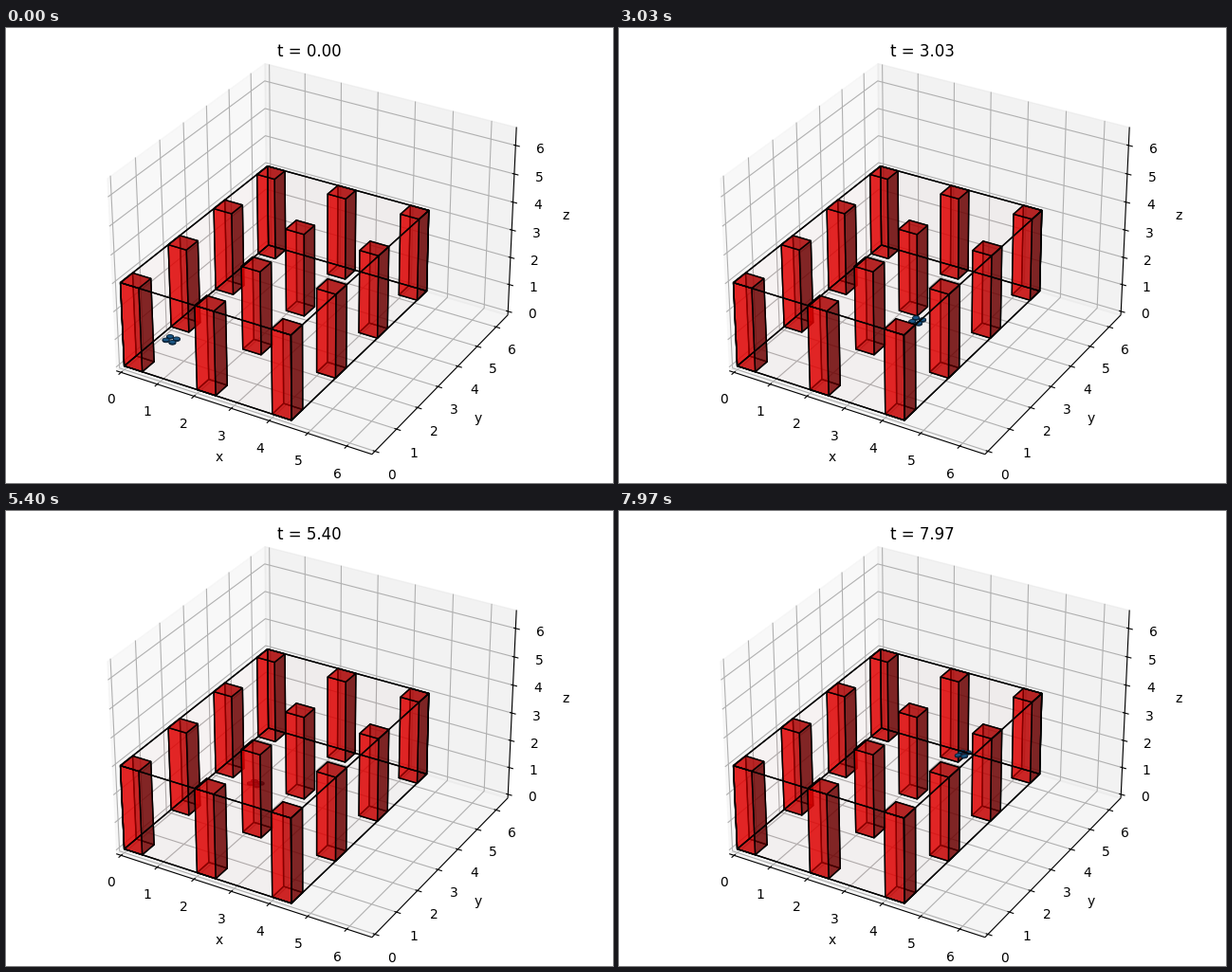
A matplotlib script that plays this animation: 640x480 px, repeating every 8 s.

```python
import itertools

import matplotlib.pyplot as plt
import numpy as np
from matplotlib.animation import FuncAnimation
from matplotlib.collections import LineCollection, PolyCollection

FPS, LOOP_MS, TICK_MS = 30, 8000, 20
SIZE = 6.5                      # axis length in metres
MARGIN = SIZE / 48
STEP = SIZE / 12                # unit for tick and label offsets
BOUNDS = (4.5, 6.5, 3.0)

# Perspective camera: elevation 30, azimuth -60, distance 10
BOX = np.array([8, 8, 6]) / 7
DIST = 10
SCALE = 480 / 0.185
CENTER = np.array([80, 0]) + 0.095 * SCALE
ELEV, AZIM = np.radians([30, -60])
BACK = np.array([np.cos(ELEV) * np.cos(AZIM),
                 np.cos(ELEV) * np.sin(AZIM), np.sin(ELEV)])
RIGHT = np.array([-np.sin(AZIM), np.cos(AZIM), 0])
UP = np.cross(BACK, RIGHT)


def project(points):
    """Return pixel positions and depths of world points."""
    q = (np.asarray(points, float) / SIZE - 0.5) * BOX
    depth = DIST - q @ BACK
    flat = np.stack([q @ RIGHT, q @ UP], axis=-1) / depth[..., None]
    return CENTER + SCALE * flat, depth


def pixels(points):
    return project(points)[0]


fig = plt.figure(figsize=(6.4, 4.8), dpi=100, facecolor="white")
ax = fig.add_axes([0, 0, 1, 1])
ax.set_xlim(0, 640)
ax.set_ylim(0, 480)
ax.axis("off")

# ---- axes: panes, grid, ticks and labels ----
LOW, HIGH = -MARGIN, SIZE + MARGIN
FAR = np.array([LOW, HIGH, LOW])
NEAR = np.array([HIGH, LOW, HIGH])


def edge_point(axis, value, shift=0.0):
    """Point on an axis line, pushed away from the centre by shift."""
    side = (1, 0, 0)[axis]
    p = FAR.copy()
    p[side] = NEAR[side]
    for k in range(3):
        if k != axis:
            p[k] += np.sign(p[k] - SIZE / 2) * shift
    p[axis] = value
    return p


def draw_pane(axis, gray):
    a, b = [k for k in range(3) if k != axis]
    corners = np.tile(FAR, (4, 1))
    corners[1:3, a] = NEAR[a]
    corners[2:4, b] = NEAR[b]
    color = (gray, gray, gray, 0.5)
    ax.add_collection(PolyCollection([pixels(corners)], facecolors=[color],
                                     edgecolors=[color], linewidths=1, zorder=1))


def draw_axis(axis, name):
    a, b = [k for k in range(3) if k != axis]
    side = (1, 0, 0)[axis]
    grid, marks = [], []
    for value in range(7):
        line = np.tile(FAR, (3, 1))
        line[0, a] = NEAR[a]
        line[2, b] = NEAR[b]
        line[:, axis] = value
        grid.append(pixels(line))

        ends = np.tile(edge_point(axis, value), (2, 1))
        out = np.sign(ends[0, side] - SIZE / 2)
        ends[:, side] += out * STEP * np.array([-0.1, 0.2])
        marks.append(pixels(ends))

        x, y = pixels(edge_point(axis, value, 11.5 * STEP * 48 / 691.2))
        ax.text(x, y, str(value), fontsize=10, ha="center", va="top")

    marks.append(pixels([edge_point(axis, LOW), edge_point(axis, HIGH)]))
    ax.add_collection(LineCollection(grid, colors="#b0b0b0", linewidths=0.8, zorder=2))
    ax.add_collection(LineCollection(marks, colors="k", linewidths=0.8, zorder=3))
    x, y = pixels(edge_point(axis, SIZE / 2, 25 * STEP * 48 / 691.2))
    ax.text(x, y, name, fontsize=10, ha="center", va="center")


for axis, gray in enumerate((0.95, 0.90, 0.925)):
    draw_pane(axis, gray)
for axis, name in enumerate("xyz"):
    draw_axis(axis, name)

title = ax.text(320, 0.92 * 480 + 6 * 100 / 72, "", fontsize=12, ha="center",
                va="baseline")

# ---- solid scene ----
LIGHT = np.array([-2, -2, 1]) / 3


def shade(axis, end):
    """Brightness of the low (0) or high (1) face along an axis."""
    return 0.65 + 0.35 * LIGHT[axis] * (1 if end else -1)


def solid(faces, edge, width):
    """Project (corners, colour) faces; return nearest depth and sorted polygons."""
    items, nearest = [], np.inf
    for corners, color in faces:
        poly, depth = project(corners)
        nearest = min(nearest, depth.min())
        items.append((depth.mean(), poly, color, edge, width))
    items.sort(key=lambda item: -item[0])
    return nearest, [item[1:] for item in items]


def cuboid(origin, span, alpha):
    origin, span = np.array(origin, float), np.array(span, float)
    faces = []
    for axis, end in itertools.product(range(3), (0, 1)):
        a, b = [k for k in range(3) if k != axis]
        unit = np.zeros((4, 3))
        unit[:, axis] = end
        unit[1:3, a] = 1
        unit[2:4, b] = 1
        faces.append((origin + unit * span, (shade(axis, end), 0, 0, alpha)))
    return solid(faces, (0, 0, 0, 1), 1.0)


pillars = [cuboid((x, y, 0), (0.5, 0.5, 3), 0.6)
           for x, y in itertools.product((0, 2, 4), (0, 2, 4, 6))]
room = cuboid((0, 0, 0), BOUNDS, 0.01)

scene = PolyCollection([], zorder=4)
ax.add_collection(scene)

# ---- quadrotor ----
ROUTE = np.array([
    # time, x, y
    (0.00, 1.00, 0.50), (0.83, 1.37, 0.72), (1.45, 2.20, 1.15),
    (2.10, 3.19, 1.68), (2.90, 3.25, 2.62), (3.83, 3.02, 3.27),
    (4.60, 2.50, 3.12), (5.40, 1.78, 2.96), (6.43, 1.21, 3.90),
    (7.15, 1.78, 4.80), (7.97, 3.05, 5.27), (8.60, 3.60, 5.40)])
KNOTS, STOPS = ROUTE[:, 0], ROUTE[:, 1:]
SPEEDS = np.gradient(STOPS, KNOTS, axis=0)
SPEEDS[0] = 0
HEIGHT, ARM, ROTOR, THICK = 1.0, 0.125, 0.08, 0.03
RING = np.linspace(0, 2 * np.pi, 13)[:-1]
BLUE = np.array([0.122, 0.467, 0.706])


def position(t):
    """Cubic Hermite curve through the route."""
    t = max(t, 0.0)
    i = min(np.searchsorted(KNOTS, t, side="right") - 1, len(KNOTS) - 2)
    h = KNOTS[i + 1] - KNOTS[i]
    s = (t - KNOTS[i]) / h
    xy = ((1 + 2 * s) * (1 - s) ** 2 * STOPS[i]
          + s * (1 - s) ** 2 * h * SPEEDS[i]
          + s * s * (3 - 2 * s) * STOPS[i + 1]
          + s * s * (s - 1) * h * SPEEDS[i + 1])
    return np.append(xy, HEIGHT)


def attitude(t, d=0.2):
    """Tilt so that thrust supports gravity and acceleration."""
    accel = (position(t + d) - 2 * position(t) + position(t - d)) / d ** 2
    b3 = accel + np.array([0, 0, 9.81])
    b3 /= np.linalg.norm(b3)
    b2 = np.cross(b3, (1, 0, 0))
    b2 /= np.linalg.norm(b2)
    return np.column_stack([np.cross(b2, b3), b2, b3])


def quadrotor(t):
    """One flat cylinder per rotor."""
    center, rot = position(t), attitude(t)
    rotors = []
    for angle in np.pi / 4 + np.arange(4) * np.pi / 2:
        faces = []
        for end in (0, 1):
            disc = np.column_stack([ARM * np.cos(angle) + ROTOR * np.cos(RING),
                                    ARM * np.sin(angle) + ROTOR * np.sin(RING),
                                    np.full(len(RING), end * THICK)])
            faces.append((center + disc @ rot.T, (*BLUE * shade(2, end), 1)))
        rotors.append(solid(faces, (0.02, 0.12, 0.2, 1), 0.6))
    return rotors


def update(n):
    # each picture starts on the nearest 10 ms; look at the middle of the tick
    ms = (n + 0.5) * TICK_MS + 5
    t = int(FPS * ms / 1000) / FPS
    solids = sorted(pillars + quadrotor(t), key=lambda s: -s[0]) + [room]
    polys, faces, edges, widths = zip(*[item for s in solids for item in s[1]])
    scene.set_verts(polys)
    scene.set_facecolor(faces)
    scene.set_edgecolor(edges)
    scene.set_linewidth(widths)
    title.set_text(f"t = {t:.2f}")
    return scene, title


anim = FuncAnimation(fig, update, frames=LOOP_MS // TICK_MS, interval=TICK_MS,
                     repeat=True, repeat_delay=0, init_func=lambda: update(0))
plt.show()
```
